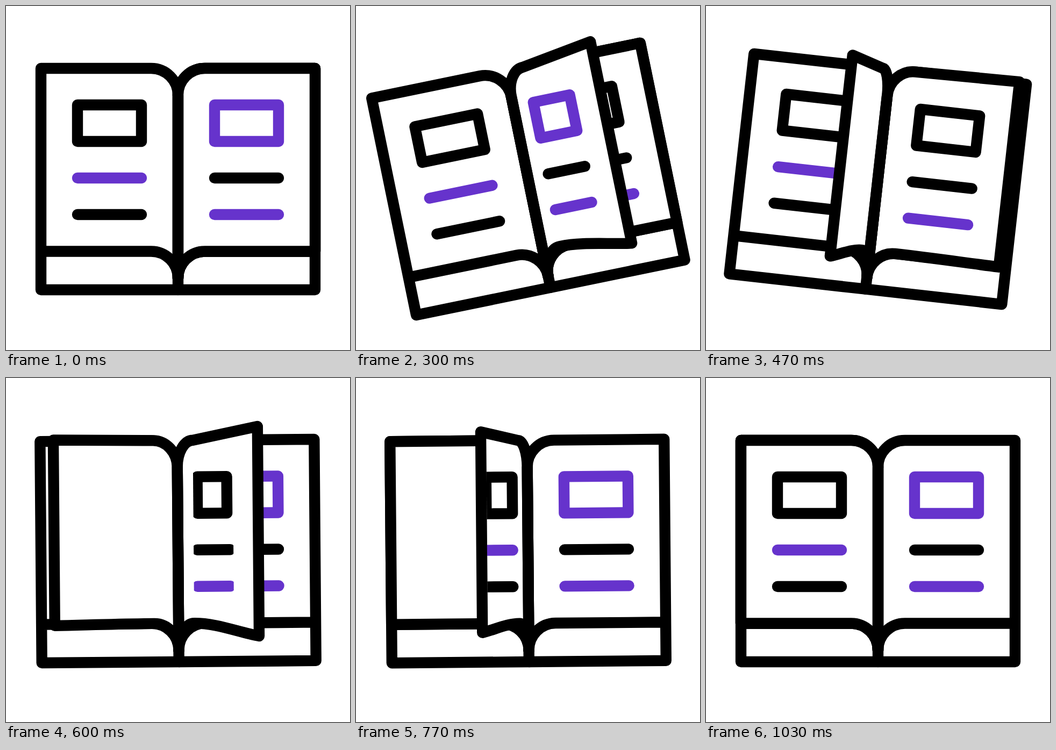
These frames come from a looping animation (640 px wide and 640 px high, 1670 ms). An HTML page without scripts:

```html
<!DOCTYPE html>
<html lang="en">
<head>
<meta charset="utf-8">
<title>Book</title>
<style>
html, body { margin: 0; width: 100%; height: 100%; overflow: hidden; background: #fff; }
svg { display: block; width: 100%; height: 100%; }
.ink { fill: none; stroke: #000; stroke-width: 20.4; stroke-linecap: round; stroke-linejoin: round; }
.p { stroke: #63c; }
.leaf { fill: #fff; }
</style>
</head>
<body>
<svg viewBox="0 0 640 640">
  <defs>
    <path id="box" d="M388 184H507V252H388Z"/>
    <path id="row1" d="M388 320H507"/>
    <path id="row2" d="M388 388H507"/>
    <path id="half" d="M320 506.5C320 478.9 342.4 456.5 370 456.5H575M320 166C320 138.4 342.4 116 370 116H575V528H320"/>
    <clipPath id="frontClip">
      <rect x="370" y="100" width="160" height="400">
        <animate attributeName="x" dur="1.67s" repeatCount="indefinite" calcMode="spline" keyTimes="0;.2395;.3593;.4263;1" keySplines="0 0 1 1;.33 0 .67 .33;.33 .33 .67 .67;0 0 1 1" values="370;370;349.5;310;310"/>
        <animate attributeName="width" dur="1.67s" repeatCount="indefinite" calcMode="spline" keyTimes="0;.2395;.3593;.4263;1" keySplines="0 0 1 1;.33 0 .67 .33;.33 .33 .67 .67;0 0 1 1" values="160;160;74.5;20;20"/>
      </rect>
    </clipPath>
    <clipPath id="backClip">
      <rect x="0" y="100" width="310" height="400">
        <animate attributeName="width" dur="1.67s" repeatCount="indefinite" calcMode="spline" keyTimes="0;.4263;.5719;1" keySplines="0 0 1 1;.33 .45 .67 1;0 0 1 1" values="310;310;565;565"/>
      </rect>
    </clipPath>
  </defs>

  <g class="ink">
    <animateTransform attributeName="transform" type="rotate" dur="1.67s" repeatCount="indefinite" calcMode="spline"
      keyTimes="0;.1647;.2904;.3982;.509;.6168;1"
      keySplines=".37 0 .63 1;.37 0 .63 1;.37 0 .63 1;.37 0 .63 1;.37 0 .63 1;0 0 1 1"
      values="0 320 320;-12.3 320 320;6.6 320 320;-3.2 320 320;1.2 320 320;0 320 320;0 320 320"/>

    <!-- resting book -->
    <use href="#half"/>
    <use href="#box" class="p"/>
    <use href="#row1"/>
    <use href="#row2" class="p"/>
    <g transform="matrix(-1 0 0 1 640 0)">
      <use href="#half"/>
      <use href="#box"/>
      <use href="#row1" class="p"/>
      <use href="#row2"/>
    </g>

    <!-- second leaf, front -->
    <g>
      <animate attributeName="display" dur="1.67s" repeatCount="indefinite" calcMode="discrete" keyTimes="0;.4263" values="inline;none"/>
      <path class="leaf" d="M320 166C320 138.4 342.4 116 370 116L575 116L575 456.5C506.7 456.5 438.3 456.5 370 456.5C342.4 456.5 320 478.9 320 506.5Z">
        <animate attributeName="d" dur="1.67s" repeatCount="indefinite" calcMode="spline" keyTimes="0;.2395;.4263;1" keySplines="0 0 1 1;.33 0 .67 .33;0 0 1 1"
          values="M320 166C320 138.4 342.4 116 370 116L575 116L575 456.5C506.7 456.5 438.3 456.5 370 456.5C342.4 456.5 320 478.9 320 506.5Z;M320 166C320 138.4 342.4 116 370 116L575 116L575 456.5C506.7 456.5 438.3 456.5 370 456.5C342.4 456.5 320 478.9 320 506.5Z;M320 166C320 138.4 320 116 320 116L320 56L320 516.5C320 497 320 456.5 320 456.5C320 456.5 320 478.9 320 506.5Z;M320 166C320 138.4 320 116 320 116L320 56L320 516.5C320 497 320 456.5 320 456.5C320 456.5 320 478.9 320 506.5Z"/>
      </path>
      <g clip-path="url(#frontClip)">
        <path d="M388 184H507V252H388Z">
          <animate attributeName="d" dur="1.67s" repeatCount="indefinite" calcMode="spline" keyTimes="0;.2395;.3593;.4263;1" keySplines="0 0 1 1;.33 0 .67 .33;.33 .33 .67 .67;0 0 1 1"
            values="M388 184H507V252H388Z;M388 184H507V252H388Z;M357 184H412.5V252H357Z;M320 184H320V252H320Z;M320 184H320V252H320Z"/>
        </path>
        <path d="M388 320H507">
          <animate attributeName="d" dur="1.67s" repeatCount="indefinite" calcMode="spline" keyTimes="0;.2395;.3593;.4263;1" keySplines="0 0 1 1;.33 0 .67 .33;.33 .33 .67 .67;0 0 1 1"
            values="M388 320H507;M388 320H507;M356 320H418;M320 320H320;M320 320H320"/>
        </path>
        <path class="p" d="M388 388H507">
          <animate attributeName="d" dur="1.67s" repeatCount="indefinite" calcMode="spline" keyTimes="0;.2395;.3593;.4263;1" keySplines="0 0 1 1;.33 0 .67 .33;.33 .33 .67 .67;0 0 1 1"
            values="M388 388H507;M388 388H507;M356 388H418;M320 388H320;M320 388H320"/>
        </path>
      </g>
    </g>

    <!-- first leaf, front -->
    <g>
      <animate attributeName="display" dur="1.67s" repeatCount="indefinite" calcMode="discrete" keyTimes="0;.2527" values="inline;none"/>
      <path class="leaf" d="M320 166C320 138.4 342.4 116 370 116L575 116L575 456.5C506.7 456.5 438.3 456.5 370 456.5C342.4 456.5 320 478.9 320 506.5Z">
        <animate attributeName="d" dur="1.67s" repeatCount="indefinite" calcMode="spline" keyTimes="0;.0731;.2527;1" keySplines="0 0 1 1;.33 0 .67 .33;0 0 1 1"
          values="M320 166C320 138.4 342.4 116 370 116L575 116L575 456.5C506.7 456.5 438.3 456.5 370 456.5C342.4 456.5 320 478.9 320 506.5Z;M320 166C320 138.4 342.4 116 370 116L575 116L575 456.5C506.7 456.5 438.3 456.5 370 456.5C342.4 456.5 320 478.9 320 506.5Z;M320 166C320 138.4 320 116 320 116L320 56L320 516.5C320 497 320 456.5 320 456.5C320 456.5 320 478.9 320 506.5Z;M320 166C320 138.4 320 116 320 116L320 56L320 516.5C320 497 320 456.5 320 456.5C320 456.5 320 478.9 320 506.5Z"/>
      </path>
      <path class="p" d="M388 184H507V252H388Z">
        <animate attributeName="d" dur="1.67s" repeatCount="indefinite" calcMode="spline" keyTimes="0;.0731;.1796;.2527;1" keySplines="0 0 1 1;.5 0 .75 .4;.33 .33 .67 .67;0 0 1 1"
          values="M388 184H507V252H388Z;M388 184H507V252H388Z;M358.3 184H428V252H358.3Z;M320 184H320V252H320Z;M320 184H320V252H320Z"/>
      </path>
      <path d="M388 320H507">
        <animate attributeName="d" dur="1.67s" repeatCount="indefinite" calcMode="spline" keyTimes="0;.0731;.1796;.2527;1" keySplines="0 0 1 1;.5 0 .75 .4;.33 .33 .67 .67;0 0 1 1"
          values="M388 320H507;M388 320H507;M358.3 320H428V320;M320 320H320;M320 320H320"/>
      </path>
      <path class="p" d="M388 388H507">
        <animate attributeName="d" dur="1.67s" repeatCount="indefinite" calcMode="spline" keyTimes="0;.0731;.1796;.2527;1" keySplines="0 0 1 1;.5 0 .75 .4;.33 .33 .67 .67;0 0 1 1"
          values="M388 388H507;M388 388H507;M358.3 388H428;M320 388H320;M320 388H320"/>
      </path>
    </g>

    <!-- backs of both leaves, mirrored -->
    <g transform="matrix(-1 0 0 1 640 0)">
      <g display="none">
        <animate attributeName="display" dur="1.67s" repeatCount="indefinite" calcMode="discrete" keyTimes="0;.2527" values="none;inline"/>
        <path class="leaf" d="M320 166C320 138.4 320 116 320 116L320 91L320 481.5C320 473 320 456.5 320 456.5C320 456.5 320 478.9 320 506.5Z">
          <animate attributeName="d" dur="1.67s" repeatCount="indefinite" calcMode="spline" keyTimes="0;.2527;.3964;1" keySplines="0 0 1 1;.33 .45 .67 1;0 0 1 1"
            values="M320 166C320 138.4 320 116 320 116L320 91L320 481.5C320 473 320 456.5 320 456.5C320 456.5 320 478.9 320 506.5Z;M320 166C320 138.4 320 116 320 116L320 91L320 481.5C320 473 320 456.5 320 456.5C320 456.5 320 478.9 320 506.5Z;M320 166C320 138.4 342.4 116 370 116L575 116L575 456.5C506.7 456.5 438.3 456.5 370 456.5C342.4 456.5 320 478.9 320 506.5Z;M320 166C320 138.4 342.4 116 370 116L575 116L575 456.5C506.7 456.5 438.3 456.5 370 456.5C342.4 456.5 320 478.9 320 506.5Z"/>
        </path>
      </g>
      <g display="none">
        <animate attributeName="display" dur="1.67s" repeatCount="indefinite" calcMode="discrete" keyTimes="0;.4263" values="none;inline"/>
        <path class="leaf" d="M320 166C320 138.4 320 116 320 116L320 91L320 481.5C320 473 320 456.5 320 456.5C320 456.5 320 478.9 320 506.5Z">
          <animate attributeName="d" dur="1.67s" repeatCount="indefinite" calcMode="spline" keyTimes="0;.4263;.5719;1" keySplines="0 0 1 1;.33 .45 .67 1;0 0 1 1"
            values="M320 166C320 138.4 320 116 320 116L320 91L320 481.5C320 473 320 456.5 320 456.5C320 456.5 320 478.9 320 506.5Z;M320 166C320 138.4 320 116 320 116L320 91L320 481.5C320 473 320 456.5 320 456.5C320 456.5 320 478.9 320 506.5Z;M320 166C320 138.4 342.4 116 370 116L575 116L575 456.5C506.7 456.5 438.3 456.5 370 456.5C342.4 456.5 320 478.9 320 506.5Z;M320 166C320 138.4 342.4 116 370 116L575 116L575 456.5C506.7 456.5 438.3 456.5 370 456.5C342.4 456.5 320 478.9 320 506.5Z"/>
        </path>
        <g clip-path="url(#backClip)">
          <path d="M388 184H507V252H388Z">
            <animate attributeName="d" dur="1.67s" repeatCount="indefinite" calcMode="spline" keyTimes="0;.4263;.5719;1" keySplines="0 0 1 1;.33 .45 .67 1;0 0 1 1"
              values="M328 184H341V252H328Z;M328 184H341V252H328Z;M388 184H507V252H388Z;M388 184H507V252H388Z"/>
          </path>
          <path class="p" d="M388 320H507">
            <animate attributeName="d" dur="1.67s" repeatCount="indefinite" calcMode="spline" keyTimes="0;.4263;.5719;1" keySplines="0 0 1 1;.33 .45 .67 1;0 0 1 1"
              values="M328 320H341;M328 320H341;M388 320H507;M388 320H507"/>
          </path>
          <path d="M388 388H507">
            <animate attributeName="d" dur="1.67s" repeatCount="indefinite" calcMode="spline" keyTimes="0;.4263;.5719;1" keySplines="0 0 1 1;.33 .45 .67 1;0 0 1 1"
              values="M328 388H341;M328 388H341;M388 388H507;M388 388H507"/>
          </path>
        </g>
      </g>
    </g>

    <path d="M320 166V524"/>
  </g>
</svg>
</body>
</html>
```
